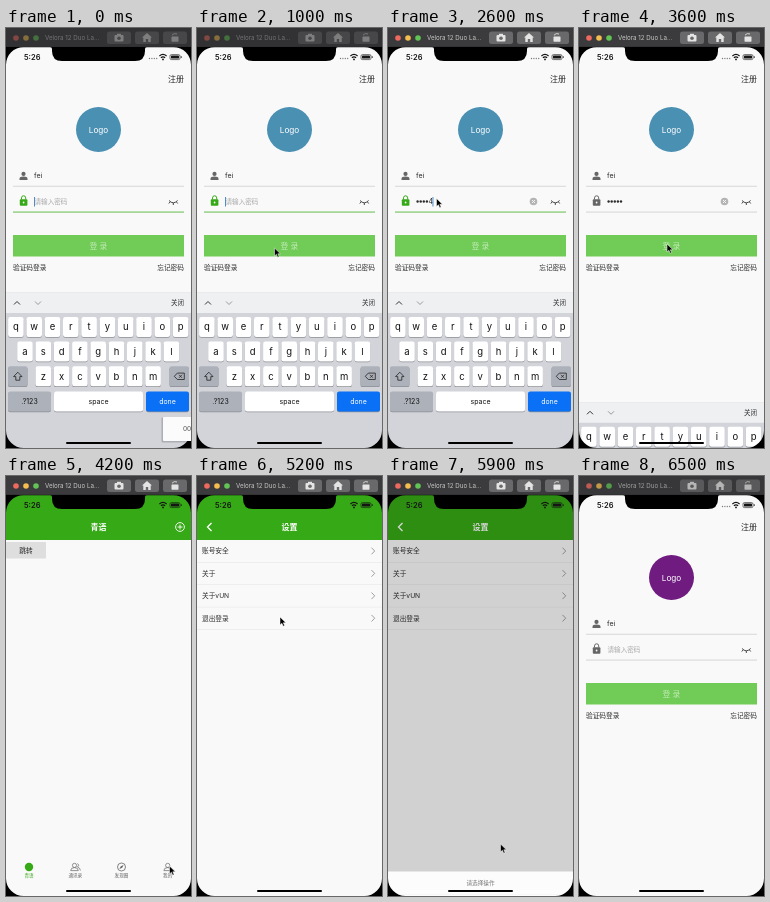
Recreate the animation shown at these times as an HTML page. Size 185 by 420 pixels, loop 6600 ms.

```html
<!DOCTYPE html>
<html lang="zh-CN">
<head>
<meta charset="utf-8">
<title>Login demo</title>
<style>
html, body { margin: 0; width: 100%; height: 100%; overflow: hidden; background: #000; }
svg { display: block; width: 100vw; height: 100vh; }
text { font-family: Inter, "Noto Sans CJK SC", "Noto Sans CJK", sans-serif; white-space: pre; }
</style>
</head>
<body>
<svg id="stage" viewBox="0 0 185 420"></svg>
<script>
const GREEN = '#36a916', INK = '#2c2c2c', PAGE = '#f9f9f9';

// Shape helpers; text is placed by its vertical centre.
const text = (x, y, s, size = 6.7, fill = INK, anchor = 'start', extra = '') =>
  `<text x="${x}" y="${y + size * 0.37}" font-size="${size}" fill="${fill}" text-anchor="${anchor}" ${extra}>${s}</text>`;
const mid = (x, y, s, size, fill, extra) => text(x, y, s, size, fill, 'middle', extra);
const rect = (x, y, w, h, fill, r = 0, extra = '') =>
  `<rect x="${x}" y="${y}" width="${w}" height="${h}" rx="${r}" fill="${fill}" ${extra}/>`;
const circle = (x, y, r, fill, extra = '') =>
  `<circle cx="${x}" cy="${y}" r="${r}" fill="${fill}" ${extra}/>`;
const line = (d, stroke, w = 0.8, extra = '') =>
  `<path d="${d}" fill="none" stroke="${stroke}" stroke-width="${w}" ${extra}/>`;
const fill = (d, color, extra = '') => `<path d="${d}" fill="${color}" ${extra}/>`;
const group = (id, body, extra = '') => `<g id="${id}" ${extra}>${body}</g>`;

const person = (x, y, c) =>
  circle(x, y - 2.1, 2.1, c) + fill(`M${x - 4} ${y + 4}v-1.2q0-2.4 4-2.4t4 2.4v1.2z`, c);
const personLine = (x, y) =>
  circle(x, y - 1.6, 2.1, 'none', 'stroke="#666" stroke-width=".7"') +
  line(`M${x - 3.8} ${y + 3.6}q0-3 3.8-3t3.8 3z`, '#666', 0.7);
const chevron = y => line(`M174.5 ${y - 3.3}l3.2 3.3l-3.2 3.3`, '#888');
const header = title => rect(0, 19, 185, 45, GREEN) + mid(92.5, 51, title, 8, '#fff', 'font-weight="600"');

function titleBar() {
  const lights = ['#ee6a5f', '#f5bd4f', '#61c454'].map((c, i) => circle(10 + i * 10, 10, 2.8, c)).join('');
  const pills = [101, 129, 157].map(x => rect(x, 3.5, 24, 12.5, '#69686a', 2.5)).join('');
  const icons =
    rect(108.5, 7, 9, 6.5, '#e4e4e4', 1) + circle(113, 10.2, 1.8, '#69686a') + rect(111, 5.8, 4, 2, '#e4e4e4') +
    fill('M141 5l5 4.5h-1.3v4.5h-2.5v-3h-2.4v3h-2.5v-4.5h-1.3z', '#e4e4e4') +
    rect(165.5, 8.5, 7, 5.2, '#e4e4e4', 0.6) + line('M166 7.2q2-2.6 5-1.2', '#e4e4e4', 0.9);
  return rect(0, 0, 185, 19, '#2c2b2d') +
    group('chrome', rect(0, 0, 185, 18.5, '#3b3a3c') + lights + pills + icons +
      text(39, 10, 'Velora 12 Duo La...', 6.2, '#c9c9c9')) ;
}

function login() {
  return rect(0, 19, 185, 401, PAGE) +
    text(178, 51, '注册', 8, INK, 'end') +
    circle(92.5, 101.5, 22.5, '#4a90b2', 'id="logo"') + mid(92.5, 101.5, 'Logo', 8.2, '#fff') +
    person(17.5, 148, '#666') + text(28, 147.5, 'fei', 7) +
    rect(7, 157.8, 171, 0.8, '#cfcfcf') +
    group('lock', rect(13.8, 171.3, 7.6, 6.4, 'currentColor', 0.9) +
      line('M15.5 171.5v-1.6a2.1 2.1 0 0 1 4.2 0v1.6', 'currentColor', 1) +
      circle(17.6, 174.5, 0.9, PAGE) + rect(7, 183.6, 171, 0.9, 'currentColor', 0, 'id="rule"')) +
    group('hint', text(28.5, 173.5, '请输入密码', 6.6, '#a8a8a8')) +
    group('entry', Array.from({ length: 5 }, (_, i) =>
      circle(29.6 + i * 3.1, 173.5, 1.2, INK, 'class="dot"')).join('') +
      text(0, 173.2, '', 7, INK, 'start', 'id="digit"') +
      circle(145.5, 173.5, 3.8, '#b4b4b4') + line('M144 172l3 3m0-3l-3 3', PAGE, 0.9)) +
    rect(0, 169, 0.9, 9.5, '#3d7fc0', 0, 'id="caret"') +
    line('M163 172.5q4.3 4.6 8.6 0M164 174l-1.2 1.5M167.3 175v2M170.5 174l1.2 1.5', '#333', 0.9) +
    rect(7, 207, 171, 21.5, '#70cb57') + mid(92.5, 218, '登 录', 7.8, '#c3ebb7') +
    text(7, 240, '验证码登录') + text(178, 240, '忘记密码', 6.7, INK, 'end');
}

function keyboard() {
  const key = (x, y, w, label, size = 9.5, bg = '#fff', ink = '#111') =>
    rect(x, y + 0.8, w, 20, '#8c8f95', 2.2) + rect(x, y, w, 20, bg, 2.2) + mid(x + w / 2, y + 9.8, label, size, ink);
  const row = (letters, x0, y) => [...letters].map((c, i) => key(x0 + i * 18.3, y, 15.6, c)).join('');
  return rect(0, 264.5, 185, 156, '#d2d4da') + rect(0, 264.5, 185, 20.5, '#eff0f2') +
    line('M8 276.5l3-3l3 3', '#333', 1) + line('M29 273.5l3 3l3-3', '#999', 1) +
    text(178, 275, '关闭', 6.5, INK, 'end') +
    row('qwertyuiop', 2.1, 289) + row('asdfghjkl', 11.2, 313.5) + row('zxcvbnm', 29.5, 338.3) +
    key(2, 338.3, 19.5, '', 8, '#adb1ba') + key(163.5, 338.3, 19.5, '', 8, '#adb1ba') +
    line('M11.8 344.2l4.2 4.4h-2.2v3.6h-4v-3.6h-2.2z', '#222') +
    line('M168.3 348.3l3-3.2h7v6.4h-7zM173 346.8l3 3m0-3l-3 3', '#222') +
    key(2, 363.5, 43, '.?123', 7, '#adb1ba') + key(48, 363.5, 89, 'space', 7) +
    key(140, 363.5, 43, 'done', 7, '#0a70f5', '#fff');
}

function tabBar(active) {
  const tint = i => i === active ? GREEN : '#666';
  const labels = ['青语', '通讯录', '发现圈', '我的'];
  return circle(23, 391, 4.2, tint(0)) +
    personLine(68.5, 391) + line('M71.5 387.5q2.5 1.6 0 3.6q2.7.6 2.9 3.4', '#666', 0.7) +
    circle(115.5, 391, 4, 'none', 'stroke="#666" stroke-width=".8"') +
    fill('M117.6 388.9l-1.4 2.8l-2.8 1.4l1.4-2.8z', '#666') +
    (active === 3 ? person(161.7, 391, GREEN) : personLine(161.7, 391)) +
    labels.map((s, i) => mid(23.1 + i * 46.2, 399.5, s, 4.6, tint(i))).join('');
}

const row = (y, label) => text(5, y, label) + chevron(y) + rect(0, y + 11, 185, 0.5, '#e3e3e3');

const home = () => rect(0, 19, 185, 401, PAGE) + header('青语') +
  circle(174, 51, 4.4, 'none', 'stroke="#fff" stroke-width=".9"') + line('M171.5 51h5M174 48.5v5', '#fff', 0.9) +
  rect(0, 66, 40, 16.5, '#dedede', 0.8) + mid(20, 74.5, '跳转', 6.7, '#222') + tabBar(0);

const mine = () => rect(0, 19, 185, 401, PAGE) + header('我的') + row(142, '设置') + tabBar(3);

const settings = () => rect(0, 19, 185, 401, PAGE) + header('设置') +
  line('M14.5 47l-4 4l4 4', '#fff', 1.3) + rect(0, 131, 142, 22, '#d9d9d9', 0, 'id="press"') +
  ['账号安全', '关于', '关于vUN', '退出登录'].map((s, i) => row(75 + i * 22.4, s)).join('');

const sheet = () => rect(0, 335, 185, 86, '#fcfcfc') + mid(92.5, 346.5, '请选择操作', 5.6, '#777') +
  rect(0, 357.5, 185, 0.4, '#eee') + mid(92.5, 369, '退出登录', 7.8, '#cf3a36') +
  rect(0, 380, 185, 1.6, '#d9d9d9') + mid(92.5, 394, '取消', 7.6, INK);

function device() {
  return text(18, 29, '5:26', 7.5, '#151515', 'start', 'font-weight="600"') +
    group('signal', [0, 1, 2, 3].map(i => circle(143.5 + i * 2.4, 30.5, 0.65, '#777')).join('')) +
    line('M153.4 28q3.6-3.2 7.2 0M154.9 29.8q2.1-1.8 4.2 0', '#151515', 1.2) + circle(157, 31.4, 0.9, '#151515') +
    rect(164, 26.6, 10, 5, 'none', 1.4, 'stroke="#151515" stroke-width=".6"') +
    rect(165, 27.6, 8, 3, '#151515', 0.6) + rect(174.8, 28.2, 0.8, 1.8, '#151515') +
    fill('M44 19q2 0 2 2v2q0 10 10 10h73q10 0 10-10v-2q0-2 2-2z', '#000') +
    fill('M0 18h185v402h-185zM17.5 19.2a17.5 17.5 0 0 0-17.5 17.5v365.8a17.5 17.5 0 0 0 17.5 17.5h150a17.5 17.5 0 0 0 17.5-17.5v-365.8a17.5 17.5 0 0 0-17.5-17.5z', '#000', 'fill-rule="evenodd"') +
    rect(60, 414, 65, 2, '#000', 1);
}

const stage = document.getElementById('stage');
stage.innerHTML = group('login', login()) + group('keys', keyboard()) + group('home', home()) +
  group('mine', mine()) + group('settings', settings()) + group('again', '') +
  rect(0, 19, 185, 401, '#000', 0, 'id="shade"') + group('sheet', sheet()) + device() + titleBar() +
  group('bubble', rect(155.5, 389.5, 40, 25, '#000', 1, 'opacity=".18"') +
    rect(157, 389, 40, 24, '#fbfbfb', 1) + text(177, 401, '00', 6.5, '#555')) +
  group('pointer', fill('M0 0v8l1.9-1.7l1.3 2.9l1.4-.6l-1.3-2.8h2.6z', '#000', 'stroke="#fff" stroke-width=".5"'));

const el = Object.fromEntries([...stage.querySelectorAll('[id]')].map(n => [n.id, n]));
const dots = [...stage.querySelectorAll('.dot')];
const show = (n, on) => n.setAttribute('display', on ? 'inline' : 'none');
const move = (n, x, y) => n.setAttribute('transform', `translate(${x} ${y})`);
const clamp = v => Math.max(0, Math.min(1, v));
const easeOut = (t, a, b) => 1 - (1 - clamp((t - a) / (b - a))) ** 3;
const smooth = p => p * p * (3 - 2 * p);

// Pointer stops: time, x, y
const path = [
  [200, 184, 400], [700, 110, 260], [1000, 77.5, 220], [1400, 48, 174], [2100, 48, 172], [2600, 48.5, 170.5],
  [2900, 48.5, 170.5], [3300, 88, 216], [3700, 88, 216], [4200, 163.5, 390], [4400, 163.5, 390],
  [4700, 83, 141], [5400, 83, 141], [5700, 112.5, 368], [5900, 112.5, 368], [6400, 190, 421]
];
function pointerAt(t) {
  let i = path.findIndex(p => p[0] > t);
  if (i < 1) i = i < 0 ? path.length - 1 : 1;
  const [a, ax, ay] = path[i - 1], [b, bx, by] = path[i];
  const k = smooth(clamp((t - a) / (b - a)));
  return [ax + (bx - ax) * k, ay + (by - ay) * k];
}

const digits = '12334';

function draw(t) {
  const back = t >= 6000;
  const typed = back ? 0 : Math.max(0, Math.min(5, Math.floor((t - 2100) / 100)));
  const masked = t >= 2900 ? typed : typed - 1;
  const focused = t < 3600;

  el.chrome.setAttribute('opacity', t < 1500 ? 0.45 : t < 6400 ? 1 : 0.75);
  show(el.bubble, t < 400);
  move(el.bubble, 28 * clamp(t / 400), 0);

  el.logo.setAttribute('fill', back ? '#701b80' : '#4a90b2');
  el.lock.setAttribute('color', focused ? GREEN : '#666');
  el.rule.setAttribute('fill', focused ? '#54b53b' : '#cfcfcf');
  show(el.hint, !typed);
  show(el.entry, typed);
  dots.forEach((d, i) => show(d, i < masked));
  el.digit.textContent = masked < typed ? digits[typed - 1] : '';
  el.digit.setAttribute('x', 28.2 + (typed - 1) * 3.1);
  el.caret.setAttribute('x', typed ? 29 + typed * 3.1 : 28);
  show(el.caret, focused && (typed || t % 1000 < 500));

  move(el.keys, 0, 156 * easeOut(t, 3500, 3800));
  show(el.keys, t < 3900);

  // Signing out brings the login page in above the settings page.
  if (back) stage.insertBefore(el.login, el.shade);
  else if (stage.firstChild !== el.login) stage.insertBefore(el.login, stage.firstChild);
  move(el.login, back ? 185 * (1 - easeOut(t, 5900, 6300)) : 0, 0);

  show(el.home, t >= 3700 && t < 4400);
  move(el.home, 185 * (1 - easeOut(t, 3700, 4100)), 0);
  show(el.mine, t >= 4400 && t < 5200);
  show(el.settings, t >= 4800);
  move(el.settings, 185 * (1 - easeOut(t, 4800, 5200)), 0);
  show(el.press, t >= 5300 && t < 5900);
  show(el.signal, t < 3800 || t >= 6200);

  const open = easeOut(t, 5300, 5600) * (1 - easeOut(t, 5800, 6100));
  el.shade.setAttribute('opacity', 0.54 * open);
  move(el.sheet, 0, 86 * (1 - open));
  show(el.sheet, open > 0);

  show(el.pointer, t >= 200 && t < 6400);
  move(el.pointer, ...pointerAt(t));
}

const start = performance.now();
function tick(now) {
  draw(Math.floor(Math.max(0, now - start) % 6600 / 100) * 100);
  requestAnimationFrame(tick);
}
draw(0);
requestAnimationFrame(tick);
</script>
</body>
</html>
```
